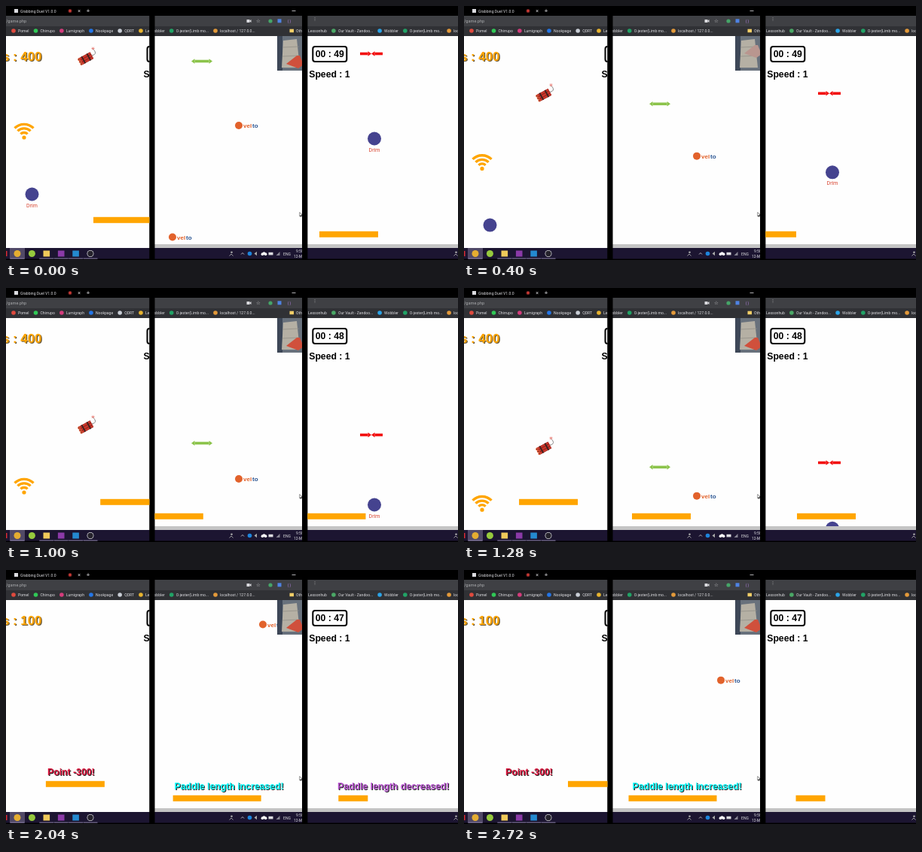
An HTML page with a canvas for the animation above (2760 ms loop, 600 by 338 pixels).

```html
<!DOCTYPE html>
<html lang="en">
<head>
<meta charset="utf-8">
<style>
html, body { margin: 0; width: 100%; height: 100%; overflow: hidden; background: #000; }
canvas { display: block; }
</style>
</head>
<body>
<canvas id="stage" width="600" height="338"></canvas>
<script>
const ctx = document.getElementById('stage').getContext('2d');
const LOOP = 2760, STEP = 40, PAGE_TOP = 40, TASKBAR = 322;
const UI = 'Roboto, sans-serif', BOLD = '"Liberation Sans", Arial, sans-serif';
const ORANGE = '#ffa500', LIGHT = '#dcdce0', SHADOW = '#222';

// Progress from 0 to 1 between two times, and easings for it.
const span = (t, from, to) => Math.min(1, Math.max(0, (t - from) / (to - from)));
const easeIn = p => p ** 3;
const easeOut = p => 1 - (1 - p) ** 2.4;
const smooth = p => p * p * (3 - 2 * p);

// Height of a falling item that may slow down a little.
const fall = (t, y, speed, drag = 1.1e-5) => y + speed * t - drag * t * t;

function rect(x, y, w, h, color) {
  ctx.fillStyle = color;
  ctx.fillRect(x, y, w, h);
}

function disc(x, y, r, color) {
  ctx.fillStyle = color;
  ctx.beginPath();
  ctx.arc(x, y, r, 0, 7);
  ctx.fill();
}

function poly(points, color) {
  ctx.fillStyle = color;
  ctx.beginPath();
  points.forEach(p => ctx.lineTo(...p));
  ctx.fill();
}

function line(points, color, width) {
  ctx.strokeStyle = color;
  ctx.lineWidth = width;
  ctx.beginPath();
  points.forEach(p => ctx.lineTo(...p));
  ctx.stroke();
}

function text(s, x, y, size, color = LIGHT, align = 'left', font = UI) {
  ctx.font = `${size}px ${font}`;
  ctx.textAlign = align;
  ctx.fillStyle = color;
  ctx.fillText(s, x, y);
}

function bold(s, x, y, size, color = '#000', align = 'left') {
  ctx.font = `bold ${size}px ${BOLD}`;
  ctx.textAlign = align;
  ctx.fillStyle = color;
  ctx.fillText(s, x, y);
}

function message(s, x, y, color) {
  bold(s, x + 1, y + 1, 12.25, SHADOW);
  bold(s, x, y, 12.25, color);
}

function clipped(x, y, w, h, draw) {
  ctx.save();
  ctx.beginPath();
  ctx.rect(x, y, w, h);
  ctx.clip();
  draw();
  ctx.restore();
}

// Lays out icon and label pairs from left to right.
function bookmarks(x, items) {
  for (const [label, color] of items) {
    disc(x, 33, 2.8, color);
    text(label, x + 6, 35, 5.1);
    x += 15 + ctx.measureText(label).width;
  }
}

function paddle(x, y, w) { rect(x, y - .2, w, 8, ORANGE); }

function wifi(x, y) {
  disc(x, y + 8, 2.6, ORANGE);
  ctx.strokeStyle = ORANGE;
  ctx.lineWidth = 3.3;
  for (let r = 6.5; r < 19; r += 5.6) {
    ctx.beginPath();
    ctx.arc(x, y + 8, r, -Math.PI * .75, -Math.PI * .25);
    ctx.stroke();
  }
}

function dynamite(x, y) {
  ctx.save();
  ctx.translate(x, y);
  ctx.strokeStyle = '#777';
  ctx.lineWidth = .9;
  ctx.beginPath();
  ctx.moveTo(7, -4);
  ctx.bezierCurveTo(15, -5, 13, -10, 9, -13);
  ctx.stroke();
  for (let a = 0; a < Math.PI; a += Math.PI / 3) {
    const dx = 2.2 * Math.cos(a), dy = 2.2 * Math.sin(a);
    line([[9.5 - dx, -13.5 - dy], [9.5 + dx, -13.5 + dy]], '#e87068', .7);
  }
  ctx.rotate(-.5);
  rect(-9, -5, 18, 10, '#7e1a14');
  for (let row = -1; row <= 1; row++) {
    rect(-9, row * 3.4 - 1.4, 18, 2.7, '#c8362b');
    disc(-8.6, row * 3.4, 1.7, '#e8623f');
    disc(-8.6, row * 3.4, .7, '#4b1511');
  }
  for (const band of [-4.5, 3.5]) rect(band, -5.2, 1.8, 10.4, '#3a2220');
  ctx.restore();
}

// Horizontal arrow from x0 to x1, with its head at x1.
function arrow(x0, x1, y, color) {
  const neck = x1 - Math.sign(x1 - x0) * 4.5;
  poly([[neck, y - 3.3], [x1, y], [neck, y + 3.3]], color);
  rect(Math.min(x0, neck), y - 1.8, Math.abs(neck - x0), 3.6, color);
}

function chatBadge(x, y) {
  disc(x, y + 6.5, 9, '#45438f');
  text('Drim', x, y + 23.5, 7, '#d8432f', 'center');
}

function netBadge(x, y) {
  disc(x - 9.5, y, 5, '#e2622b');
  bold('vel', x - 3.5, y + 3, 8, '#e2622b');
  bold('to', x + 8.5, y + 3, 8, '#24508f');
}

function hud(x, seconds) {
  ctx.strokeStyle = '#000';
  ctx.lineWidth = 2;
  ctx.beginPath();
  ctx.roundRect(x + 5, 54, 45, 20, 3);
  ctx.stroke();
  bold('00 : ' + seconds, x + 27.5, 68.3, 12.2, '#000', 'center');
  bold('Speed : 1', x, 95, 12.2);
}

function camera(t) {
  const lift = 14 * Math.max(0, 1 - Math.abs(t - 400) / 360);
  clipped(360, PAGE_TOP, 33, 46, () => {
    rect(360, PAGE_TOP, 33, 46, '#68717c');
    rect(360, PAGE_TOP, 7, 46, '#3d4757');
    poly([[368, 46], [386, 44], [390, 82], [366, 82]], '#b5b0a4');
    for (const y of [55, 67]) line([[367, y], [389, y - 1]], '#8f8c84', .7);
    ctx.translate(381, 74 - lift);
    poly([[-9, 3], [5, -8], [9, -8], [14, 4], [7, 9]], lift > 7 ? '#b9968f' : '#d0503c');
  });
}

function person(x) {
  disc(x + .5, 327.8, 1.3, '#aaa');
  line([[x - 2.5, 332.5], [x, 330], [x + 2.5, 332.5]], '#aaa', .9);
}

function leftChrome() {
  rect(11, 4, 5, 5, LIGHT);
  text('Grabbing Duel V1.0.0', 19, 8.8, 5.1);
  disc(85, 6.5, 2.5, '#7d2426');
  disc(85, 6.5, 1.2, '#ea4335');
  text('×', 97, 9, 7, LIGHT, 'center');
  text('+', 109, 9, 8, LIGHT, 'center');
  text('/game.php', 0, 22, 5.6, '#a9aaad');
  bookmarks(10, [['Pomel', '#df4a3e'], ['Chirrupo', '#30c956'], ['Lumigraph', '#d43c7c'],
    ['Nookpage', '#2376e8'], ['QDRT', '#c9ced6'], ['Lessonhub', '#e8b42f']]);

  rect(5, TASKBAR, 20, 14.5, '#514967');
  rect(0, 326, 1.5, 7, '#d42b32');
  ['#e5ad31', '#96c93d', '#f0c95a', '#8b3aa8', '#2489d0', '#cfcfd4'].forEach((color, i) => {
    const x = 15 + 19.4 * i;
    if (i > 1 && i < 5) rect(x - 4.3, 325.5, 8.6, 8, color);
    else disc(x, 329.5, 4.5, color);
    if (i === 5) disc(x, 329.5, 3.7, '#25222c');
    if (i !== 1) rect(x - 9.5, 335.6, 19, 1, '#8d83aa');
  });
}

function middleChrome() {
  rect(379.5, 6, 5, .8, LIGHT);
  rect(319.5, 18, 4, 4, LIGHT);
  poly([[323, 20], [325.5, 18], [325.5, 22]], LIGHT);
  text('☆', 335, 22.3, 6.5, LIGHT, 'center', '"DejaVu Sans", sans-serif');
  disc(351, 20, 2.6, '#46a568');
  rect(360.5, 17.3, 5, 5, '#4f83e3');
  text('{ }', 376, 22, 5, '#a77bd0', 'center');
  bookmarks(186, [['Wobbler', '#2ba4e8'], ['O-jester(Limb mo...', '#21a366'],
    ['localhost / 127.0.0...', '#e49a3a']]);
  rect(376.5, 30.7, 5.5, 4.5, '#f3cf68');
  text('Other', 385, 35, 5.1);

  person(299);
  line([[312, 330.5], [314, 328.5], [316, 330.5]], LIGHT, .8);
  disc(323.5, 329.5, 2.8, '#1d84dc');
  poly([[329.5, 329.5], [333, 326.8], [333, 332.2]], '#aaa');
  for (let i = 0; i < 3; i++) disc(340.5 + 2 * i, 330.2 - i % 2, 1.9, '#fff');
  rect(348.5, 327.8, 6, 3.6, LIGHT);
  poly([[358.5, 332], [363.5, 327], [363.5, 332]], '#888694');
  text('ENG', 368, 331.7, 5.1);
  text('9:58 PM', 385, 328.3, 4.9);
  text('12-May', 382, 335, 4.9);
}

function rightChrome() {
  for (let i = 0; i < 3; i++) disc(410, 15.5 + 1.8 * i, .5, '#999');
  bookmarks(395, [['Lessonhub', '#e8b42f'], ['Our Vault - Zandoo...', '#4aa866'],
    ['Wobbler', '#2ba4e8'], ['O-jester(Limb mo...', '#21a366'], ['localhost', '#e49a3a']]);
  person(597);
}

function leftGame(t) {
  const hit = t >= 1960;
  const score = hit ? 'Points : 100' : 'Points : 400';
  bold(score, 48.5, 74.3, 16.8, '#6b5a3a', 'right');
  bold(score, 47.3, 73, 16.8, ORANGE, 'right');
  hud(182.5, 49);
  clipped(0, PAGE_TOP, 190, 264, () => {
    wifi(24, fall(t, 167, .108));
    chatBadge(34.5, fall(t, 244, .107));
  });
  if (hit) message('Point -300!', 55, 273, '#dc143c');
  else dynamite(106, fall(t, 70, .126));
  const out = 84 * span(t, 0, 400), back = 150 * easeOut(span(t, 760, 1720));
  paddle(116 + out - back + 88 * easeIn(span(t, 1720, 2720)), 281, 78);
}

function middleGame(t) {
  const hit = t >= 1800;
  netBadge(318.5, fall(t, 159, .106));
  netBadge(230.5, fall(t, 307.5, .106));
  netBadge(350.5, fall(t - 1760, 42, .109, 0));
  paddle(101 + 122 * smooth(span(t, 540, 1280)) - 4.5 * span(t, 1800, 2600), 300, hit ? 117 : 78);
  if (hit) return message('Paddle length increased!', 223.5, 292.3, '#00ffff');
  const y = fall(t, 73.5, .148, 1.5e-5);
  for (const tip of [246, 274]) arrow(260, tip, y, '#8bc34a');
}

function rightGame(t) {
  const hit = t >= 1640;
  hud(402.3, t < 960 ? 49 : t < 2000 ? 48 : 47);
  chatBadge(489, fall(t, 170, .112, 0));
  paddle(416 - 53 * span(t, 0, 400) + 79 * span(t, 760, 1280) - 1.5 * span(t, 1720, 2400), 300, hit ? 39 : 78);
  if (hit && t < 2640) message('Paddle length decreased!', 440, 292.3, '#ba55d3');
  if (!hit) for (const tail of [470, 500]) arrow(tail, 485, fall(t, 63.5, .132, 0), '#f20d0d');
}

// One browser window seen through a vertical slot; the page ends at pageBottom.
function panel(x, w, pageBottom, chrome, game) {
  clipped(x, 0, w, 338, () => {
    rect(x, 13, w, 14, '#3f4044');
    rect(x, 27, w, 13, '#303135');
    rect(x, PAGE_TOP, w, pageBottom - PAGE_TOP, '#fefefe');
    rect(x, pageBottom, w, TASKBAR - pageBottom, '#c4c4c4');
    rect(x, TASKBAR, w, 14.5, '#1c1531');
    chrome();
  });
  clipped(x, PAGE_TOP, w, pageBottom - PAGE_TOP, game);
}

function draw() {
  const t = Math.floor((performance.now() - start) % LOOP / STEP) * STEP;
  rect(0, 0, 600, 338, '#000');
  panel(0, 190.5, TASKBAR, leftChrome, () => leftGame(t));
  panel(197.3, 195.7, 317, middleChrome, () => {
    middleGame(t);
    camera(t);
    poly([[389.5, 274], [389.5, 280], [392, 280.8], [393.8, 278]], '#555');
    poly([[390, 275.3], [390, 278.8], [392.6, 277.7]], '#fff');
  });
  panel(400.2, 199.8, 317, rightChrome, () => rightGame(t));
  requestAnimationFrame(draw);
}

const start = performance.now();
draw();
</script>
</body>
</html>
```
